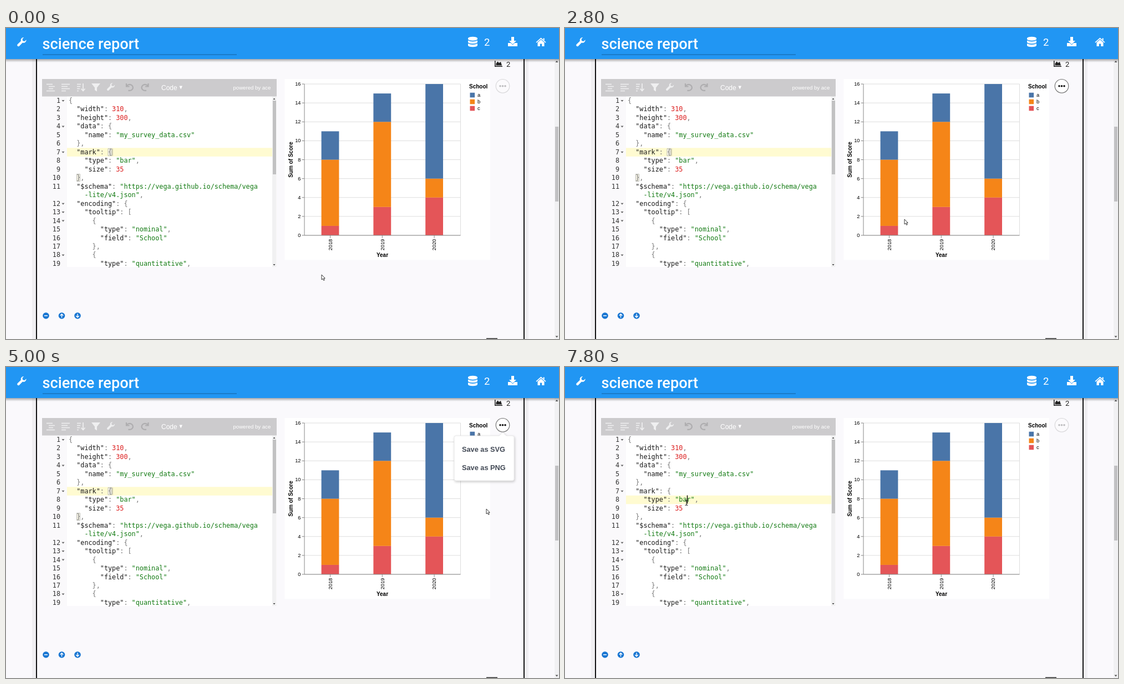
Animation of 997x561 px, one loop 8000 ms. Source, as an HTML page:

```html
<!DOCTYPE html>
<html lang="en">
<head>
<meta charset="utf-8">
<title>Science report</title>
<style>
html, body { margin: 0; width: 100%; height: 100%; overflow: hidden; background: #faf9fc; }
svg { display: block; width: 100%; height: 100%; }
text { white-space: pre; }
.sans { font-family: "Liberation Sans", Arial, sans-serif; font-size: 10px; }
.small { font-size: 9.3px; }
.bold { font-weight: 700; }
.end { text-anchor: end; }
.mid { text-anchor: middle; }
.roboto { font-family: Roboto, sans-serif; }
.code { font-family: "DejaVu Sans Mono", monospace; font-size: 11.8px; }
.key { fill: #1a1a1a; }
.str { fill: #127a12; }
.num { fill: #dc1f1f; }
.sym { fill: #777; }
</style>
</head>
<body>
<svg viewBox="0 0 997 561" xmlns="http://www.w3.org/2000/svg">
  <defs>
    <linearGradient id="fade" x2="0" y2="1">
      <stop offset="0" stop-color="#000" stop-opacity=".32"/>
      <stop offset="1" stop-color="#000" stop-opacity="0"/>
    </linearGradient>
    <filter id="shadow" x="-20%" y="-20%" width="140%" height="150%">
      <feDropShadow dx="1" dy="2" stdDeviation="2" flood-opacity=".22"/>
    </filter>
    <path id="wrench" d="M17 4.2A5 5 0 0 1 10.400 9.500L4.300 15.700A2.200 2.200 0 0 1 1.200 12.600L7.400 6.500A5 5 0 0 1 12.700 0L10 2.800L10.600 6.300L14.200 6.900Z"/>
  </defs>

  <!-- page -->
  <rect width="997" height="561" fill="#faf9fc"/>
  <path d="M47 56h7v505h-7zM936 56h6v505h-6z" fill="#f0eff2"/>
  <path d="M55 56V561M934 56V561" stroke="#111" stroke-width="2"/>
  <rect x="989" y="56" width="8" height="505" fill="#f1f1f3"/>
  <rect x="990" y="178" width="6" height="135" fill="#c1c1c3"/>
  <path d="M990.500 62l2.500-3 2.500 3zM990.500 555.500l2.500 3 2.500-3z" fill="#555"/>
  <rect x="866" y="559.500" width="20" height="2" fill="#333"/>
  <g fill="#222">
    <path d="M881 59h1.500v9.500H895V70H881z"/>
    <path d="M883.500 67.500v-3.500l3-3.500 2.500 2.500 3-2 2 6.500z"/>
    <text class="roboto" x="902" y="69.500" font-size="13">2</text>
  </g>

  <!-- header -->
  <rect y="56" width="997" height="6" fill="url(#fade)"/>
  <rect width="997" height="56" fill="#2196f3"/>
  <path d="M66 48H416" stroke="#14609e"/>
  <g fill="#fff">
    <use href="#wrench" x="19.500" y="17"/>
    <text class="roboto" x="65.500" y="37.500" font-size="27.200" font-weight="500">science report</text>
    <text class="roboto" x="862" y="32" font-size="18.500">2</text>
    <path d="M833 18.500a8.500 2.800 0 0 1 17 0v1.500a8.500 2.800 0 0 1-17 0zM833 22.500q8.500 4 17 0v3a8.500 2.800 0 0 1-17 0zM833 28q8.500 4 17 0v3.500a8.500 2.800 0 0 1-17 0z"/>
    <path d="M911 16h5v7h4l-6.500 6.500-6.500-6.500h4zM905 27h5l3.500 3.500 3.500-3.500h5v6h-17z"/>
    <path d="M964.500 17.500l9 8-1 1.200-8-7-8 7-1-1.200zM958.500 26.300l6-5.200 6 5.200V33h-4.300v-4.600h-3.400V33h-4.300zM968.500 18.500h2.200v4l-2.200-2z"/>
  </g>

  <!-- round buttons -->
  <g fill="#1976d2"><circle cx="72" cy="519" r="5.800"/><circle cx="100.500" cy="519" r="5.800"/><circle cx="129" cy="519" r="5.800"/></g>
  <path d="M69 519h6M100.500 522.500v-6.500m-2.800 2.800l2.800-2.800 2.800 2.800M129 515.500v6.500m-2.800-2.800l2.800 2.800 2.800-2.800" fill="none" stroke="#fff" stroke-width="1.400"/>

  <!-- editor -->
  <rect x="65" y="92" width="423" height="339" fill="#fff"/>
  <rect x="65" y="123" width="45" height="308" fill="#faf9fb"/>
  <rect x="65" y="92" width="423" height="31.500" fill="#cccbcd"/>
  <path d="M73 101.500h11M77 105.500h11M77 109.500h8M73 113.500h15M100 101.500h15M100 105.500h11M100 109.500h15M100 113.500h8M128 101.500h7M128 105.500h6M128 109.500h5M128 113.500h3M139 100v13m-3.500-3.500l3.500 4 3.500-4" fill="none" stroke="#efeff0" stroke-width="1.700"/>
  <path d="M154 100h16l-6 7.500v7l-4-2.500v-4.500z" fill="#efeff0"/>
  <use href="#wrench" transform="translate(181.500 99) scale(.86)" fill="#efeff0"/>
  <path id="undo" d="M217 100v5.500h5.500M217.500 105a6 5.500 0 1 1 3 7.500" fill="none" stroke="#aeadaf" stroke-width="2.200"/>
  <use href="#undo" transform="matrix(-1 0 0 1 473.500 0)"/>
  <g class="sans" fill="#fff">
    <text x="280" y="111.500" style="font-size:12px">Code</text>
    <path d="M312.500 104.500h5.500l-2.750 6z"/>
    <text x="409.500" y="110.500" style="font-size:9.600px">powered by ace</text>
  </g>
  <rect id="active" x="110" width="370" height="15.500" fill="#fffbd1"/>
  <g id="match">
    <path d="M184 217.500h6.500v13H184zM127.500 263.500h6v13h-6z" fill="#f3f1e4" stroke="#b9b9b4" stroke-width=".9"/>
    <path d="M192 217.500v13" stroke="#a8a796"/>
  </g>
  <g id="code" class="code"></g>
  <path id="caret" d="M220.500 231.500v15" stroke="#111" stroke-width="1.500"/>
  <rect x="480" y="124" width="7.500" height="307" fill="#f1f1f2"/>
  <rect x="481" y="131" width="6" height="133" fill="#c1c1c2"/>
  <path d="M481.500 129l2-2.500 2 2.500zM481.500 426l2 2.500 2-2.500z" fill="#444"/>

  <!-- chart -->
  <rect x="502.500" y="92" width="370.500" height="326.500" fill="#fff"/>
  <g id="chart" class="sans"></g>
  <g id="dots">
    <circle cx="895.500" cy="104.800" r="12.300" fill="#fff" stroke="#777" stroke-width="1.200"/>
    <path d="M891 104.800h.01M895.500 104.800h.01M900 104.800h.01" stroke="#111" stroke-width="3.600" stroke-linecap="round"/>
  </g>
  <g id="menu">
    <path d="M811 124h78l6.500-6 6.500 6h11q3 0 3 3v75q0 3-3 3H811q-3 0-3-3V127q0-3 3-3z" fill="#fff" stroke="#ddd" stroke-width=".7" filter="url(#shadow)"/>
    <g class="sans bold" fill="#434a56" style="font-size:12.750px">
      <text x="822" y="152.500">Save as SVG</text>
      <text x="822" y="185.500">Save as PNG</text>
    </g>
  </g>
  <g id="tip" class="sans">
    <rect width="75" height="68" rx="2" fill="#fff" fill-opacity=".95" stroke="#e2e2e2" filter="url(#shadow)"/>
    <g class="end" fill="#7b7b7b"><text x="41.500" y="18.800">School:</text><text x="41.500" y="36.500">Score:</text><text x="41.500" y="54.300">Year:</text></g>
    <g id="vals" fill="#000"><text x="45" y="18.800"></text><text x="45" y="36.500"></text><text x="45" y="54.300"></text></g>
  </g>

  <!-- pointers -->
  <path id="arrow" d="M0 0v9l2.200-1.800 1.500 3.200 1.600-.8-1.500-3 2.400-.2z" fill="#fff" stroke="#222" stroke-width=".9"/>
  <path id="hand" d="M1 1q1-1.200 2 0v3q4 0 5.500 1.200v3.500L7.500 10.500H2.500L-1.500 6.500q.5-1.200 2.500.2z" fill="#fff" stroke="#222" stroke-width=".9"/>
  <path id="beam" d="M-2.500-4.500q2 0 2.500 1 .5-1 2.500-1M-2.500 4.500q2 0 2.500-1 .5 1 2.500 1M0-3.500v7" fill="none" stroke="#222" stroke-width="1.100"/>
</svg>
<script>
const $ = id => document.getElementById(id);
const show = (id, on) => $(id).style.display = on ? '' : 'none';
const move = (id, x, y) => $(id).setAttribute('transform', `translate(${x.toFixed(1)} ${y.toFixed(1)})`);

// Code listing; rows without a number continue the one above.
const ROW = 15.47, CHAR = 7.1;
const rowY = i => 131 + i * ROW;
const lines = [
  '{', '  "width": 310,', '  "height": 300,', '  "data": {', '    "name": "my_survey_data.csv"', '  },',
  '  "mark": {', '    "type": "bar",', '    "size": 35', '  },',
  '  "$schema": "https://vega.github.io/schema/vega', '    -lite/v4.json",',
  '  "encoding": {', '    "tooltip": [', '      {', '        "type": "nominal",',
  '        "field": "School"', '      },', '      {', '        "type": "quantitative",'
];
const token = /("[^"]*")(?=:)|("[^"]*"?|-lite[^,]*)|(\d+)|[^\s"]/g;
let number = 0;
$('code').innerHTML = lines.map((line, i) => {
  const y = rowY(i) + 4;
  let out = '';
  if (!line.includes('-lite')) {
    out += `<text class="end" x="98" y="${y}" fill="#333">${++number}</text>`;
    if (/[{[]$/.test(line)) out += `<path d="M100.500 ${y - 5}h5l-2.500 3z" fill="#666"/>`;
  }
  for (const m of line.matchAll(token)) {
    const kind = m[1] ? 'key' : m[2] ? 'str' : m[3] ? 'num' : 'sym';
    out += `<text class="${kind}" x="${113 + m.index * CHAR}" y="${y}">${m[0]}</text>`;
  }
  return out;
}).join('');

// Stacked bar chart
const LEFT = 538, RIGHT = 819.5, BASE = 374, UNIT = 17.06;
const colors = { a: '#4a75a8', b: '#f58518', c: '#e45558' };
const data = { 2018: { c: 1, b: 7, a: 3 }, 2019: { c: 3, b: 9, a: 3 }, 2020: { c: 4, b: 2, a: 10 } };
const bars = [];
let chart = '';
for (let v = 0; v <= 16; v += 2) {
  const y = BASE - v * UNIT;
  chart += `<path d="M${LEFT} ${y}H${RIGHT}" stroke="#ddd"/><path d="M533.500 ${y}H${LEFT}" stroke="#888"/>
    <text class="small end" x="531.500" y="${y + 3}">${v}</text>`;
}
chart += `<path d="M${RIGHT} 101V${BASE}" stroke="#ddd"/>`;
Object.keys(data).forEach((year, i) => {
  const cx = 584.5 + i * 93.8;
  let y = BASE;
  for (const [school, score] of Object.entries(data[year])) {
    y -= score * UNIT;
    bars.push({ x: cx - 15.9, y, h: score * UNIT, school, score, year });
    chart += `<rect x="${cx - 15.9}" y="${y}" width="31.800" height="${score * UNIT}" fill="${colors[school]}"/>`;
  }
  chart += `<path d="M${cx} ${BASE}v5" stroke="#888"/>
    <text class="small end" transform="translate(${cx + 3.2} 380.500) rotate(-90)">${year}</text>`;
});
chart += `<path d="M${LEFT} 101V${BASE}H${RIGHT}" fill="none" stroke="#888"/>
  <text class="bold mid" x="678.500" y="412.500">Year</text>
  <text class="bold mid" transform="translate(516.500 237.500) rotate(-90)">Sum of Score</text>
  <text class="bold" x="835" y="109">School</text>`;
Object.keys(colors).forEach((s, i) => {
  const y = 121 + i * 12;
  chart += `<rect x="836.500" y="${y - 4.3}" width="8.600" height="8.600" fill="${colors[s]}"/>
    <text class="small" x="850" y="${y + 3}">${s}</text>`;
});
$('chart').innerHTML = chart;

// Pointer path: time, x, y
const path = [
  [0, 569, 445], [600, 569, 445], [800, 571, 400], [1200, 578, 219], [1800, 598, 314], [2000, 592, 351],
  [2400, 587, 366], [2600, 587, 366], [2800, 612, 345], [3400, 850, 150], [3800, 898, 100], [4200, 898, 100],
  [4600, 880, 165], [5000, 866, 256], [5200, 866, 256], [5400, 835, 262], [6200, 328, 258], [6400, 250, 239],
  [6600, 226, 238], [7000, 219, 238], [7400, 219, 238], [7800, 219, 245], [8000, 219, 245]
];
function pointer(t) {
  const i = path.findIndex(p => p[0] > t);
  const [t0, x0, y0] = path[i - 1], [t1, x1, y1] = path[i];
  const k = (t - t0) / (t1 - t0);
  return [x0 + (x1 - x0) * k, y0 + (y1 - y0) * k];
}
const inside = (x, y, l, t, r, b) => x >= l && x <= r && y >= t && y <= b;

function draw(ms) {
  const t = Math.floor(ms % 8000 / 200) * 200;
  const [x, y] = pointer(t);
  const menu = t >= 4000 && t < 5400;
  const clicked = t >= 7400;

  const onLink = Math.hypot(x - 895.5, y - 105) < 13 || (menu && inside(x, y, 808, 118, 916, 205));
  const inText = inside(x, y, 110, 124, 480, 431);
  const kind = onLink ? 'hand' : inText ? 'beam' : 'arrow';
  for (const id of ['arrow', 'hand', 'beam']) show(id, id === kind);
  move(kind, x, y);

  const bar = bars.find(b => inside(x, y, b.x, b.y, b.x + 31.8, b.y + b.h));
  show('tip', bar);
  if (bar) {
    move('tip', x + 8 + (y > 240 ? 2 : 0), y + (y > 240 ? 9 : 6));
    [bar.school, bar.score, bar.year].forEach((v, i) => $('vals').children[i].textContent = v);
  }

  $('dots').setAttribute('opacity', inside(x, y, 503, 92, 909, 418) ? 1 : 0.25);
  show('menu', menu);
  show('match', !clicked);
  show('caret', clicked);
  $('active').setAttribute('y', rowY(clicked ? 7 : 6) - 7.5);
}

const start = performance.now();
function tick() {
  draw(performance.now() - start);
  requestAnimationFrame(tick);
}
tick();
</script>
</body>
</html>
```
